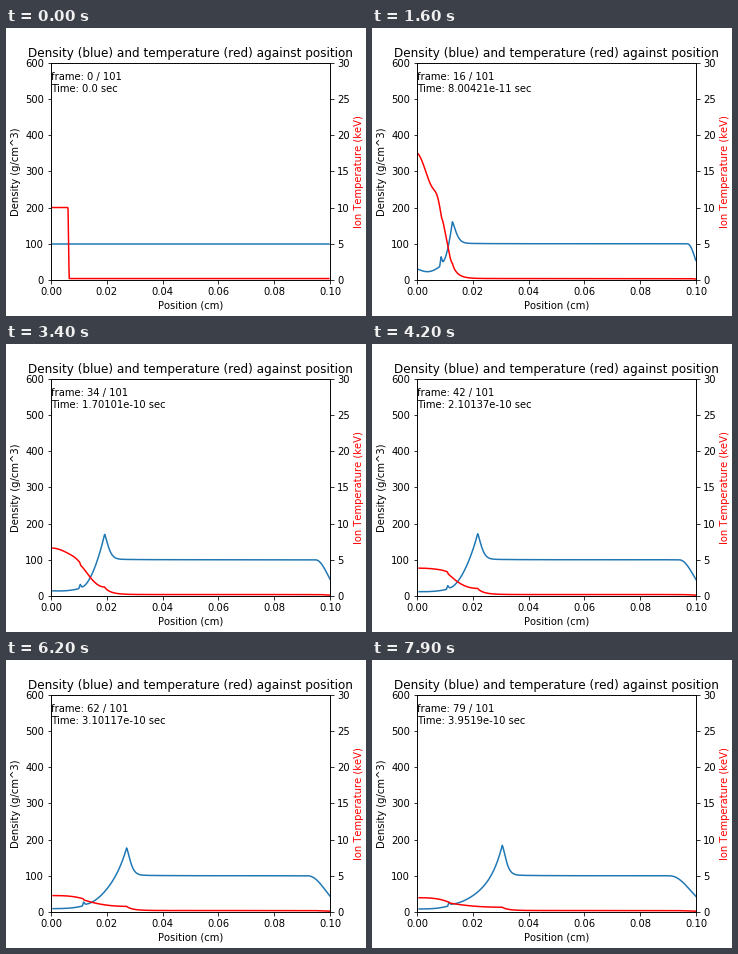
Animation, 360 px wide and 288 px high, one loop 8 s. Source, as a matplotlib script:

```python
import numpy as np
import matplotlib.pyplot as plt
from matplotlib.animation import FuncAnimation

FRAMES, INTERVAL = 80, 100
UM = 1e-4  # micrometres to cm
AMBIENT, COLD = 100, 0.2

# Simulation clock: logged steps and times in ps, even in between
CLOCK_STEPS = [0, 9, 23, 34, 51, 62, 79]
CLOCK_PS = [0, 45.0583, 115.026, 170.101, 255.177, 310.117, 395.19]


def part(x, a, b):
    return np.clip((x - a) / (b - a), 0, 1)


def young(n):
    """Fades from 1 to 0 while the hot spot blows apart."""
    return np.exp(-(n / 16) ** 1.5)


def pulse(n):
    """Rarefaction wave crossing the core, strongest at step 9."""
    return (n / 9 * np.exp(1 - n / 9)) ** 2


def focus(n):
    """Wave converging on the centre around step 23."""
    return np.exp(-((n - 23) / 12) ** 2)


def contact_at(n):
    return 63 + 1.66 * n - 0.0127 * n**2


def shock_at(n):
    return max(59.3 + 4.5 * n - 0.0175 * n**2, contact_at(n) + 10)


def edge_factor(x, n):
    """Outer surface expanding into vacuum."""
    width = 4.57 * n**0.7
    depth = np.maximum(x - (1000 - width), 0)
    return np.exp(-(depth / (width + 7)) ** 2.2)


def density(x, n):
    core = 6.5 + 93.5 / (1 + (n / 9) ** 1.8)
    rim = 16 + 84 * np.exp(-n / 11.5)
    shell = 21.5 + 78.5 * young(n)
    spike = shell * (1 + 0.27 * min(1, n / 6))
    peak = 100 + 70 * (1 - np.exp(-n / 8)) + 14 * (n / 79) ** 3
    bend = 0.4 * (n / 79) ** 3

    contact, shock = contact_at(n), shock_at(n)
    a, b = contact - 5, contact + 6
    u = part(x, 0, a)
    inner = core + (rim - core) * u**3 - 13 * pulse(n) * np.sin(np.pi * u)
    skin = np.interp(x, [a, contact, b], [rim, spike, shell])
    v = part(x, b, shock)
    ramp = shell + (peak - shell) * ((1 - bend) * v**1.7 + bend * v**6)
    d = np.maximum(x - shock, 0)
    ahead = AMBIENT + (peak - AMBIENT) * (
        0.97 * np.exp(-(d / 18) ** 1.38) + 0.03 * np.exp(-d / 90))
    rho = np.select([x <= a, x <= b, x <= shock], [inner, skin, ramp], ahead)
    return rho * edge_factor(x, n)


def temperature(x, n):
    start = min(1, n / 5)
    core = (1.7 + 4 * np.exp(-n / 28)
            + (20 - 15.7 * young(n)) / (1 + (n / 26.8) ** 6))
    rim = 0.9 + 9.1 / (1 + (n / 30) ** 3) + pulse(n)
    shell = COLD + start * (0.9 * rim - COLD)
    front = COLD + start * 37 / (n + 1.5)
    reach = 22 * (1 - 0.6 * young(n))

    contact, shock = contact_at(n), shock_at(n)
    a, b = contact - 2, contact + 2
    u = part(x, 0, a)
    inner = (core - (core - rim) * u ** (3 - 2.3 * focus(n))
             - 0.95 * pulse(n) * np.sin(2 * np.pi * u**2))
    skin = np.interp(x, [a, b], [rim, shell])
    v = part(x, b, shock)
    slope = (1 - v ** (1 + 0.6 * focus(n))) ** (2.2 - 1.5 * young(n))
    ramp = front + (shell - front) * slope
    d = np.maximum(x - shock, 0)
    ahead = COLD + (front - COLD) * np.exp(-(d / reach) ** 0.9)
    temp = np.select([x <= a, x <= b, x <= shock], [inner, skin, ramp], ahead)
    return temp * edge_factor(x, n) ** 0.67


plt.rcParams["font.family"] = "DejaVu Sans"
plt.rcParams["text.kerning_factor"] = 6
fig, ax = plt.subplots(figsize=(5, 4), dpi=72, facecolor="white")
fig.subplots_adjust(left=0.125, right=0.9, bottom=0.125, top=0.88)
ax.set_title("Density (blue) and temperature (red) against position")
ax.set(xlim=(0, 0.1), ylim=(0, 600),
       xlabel="Position (cm)", ylabel="Density (g/cm^3)")
ax2 = ax.twinx()
ax2.set_ylim(0, 30)
ax2.set_ylabel("Ion Temperature (keV)", color="red")

rho_line, = ax.plot([], [], color="tab:blue", lw=1.5)
temp_line, = ax2.plot([], [], color="red", lw=1.5)
label = ax.text(0, 520, "")


def update(n):
    first = 2.5 + 5 * min(1, n / 40)
    last = 996 + 0.2 * n
    x = np.sort(np.append(np.linspace(first, last, 900),
                          [contact_at(n), shock_at(n)]))
    rho_line.set_data(x * UM, density(x, n))
    temp_line.set_data(x * UM, temperature(x, n))
    t = float(f"{np.interp(n, CLOCK_STEPS, CLOCK_PS) * 1e-12:.6g}")
    label.set_text(f"frame: {n} / 101\nTime: {t} sec")
    return rho_line, temp_line, label


anim = FuncAnimation(fig, update, frames=FRAMES, interval=INTERVAL,
                     repeat=True, repeat_delay=0, blit=False)
plt.show()
```
